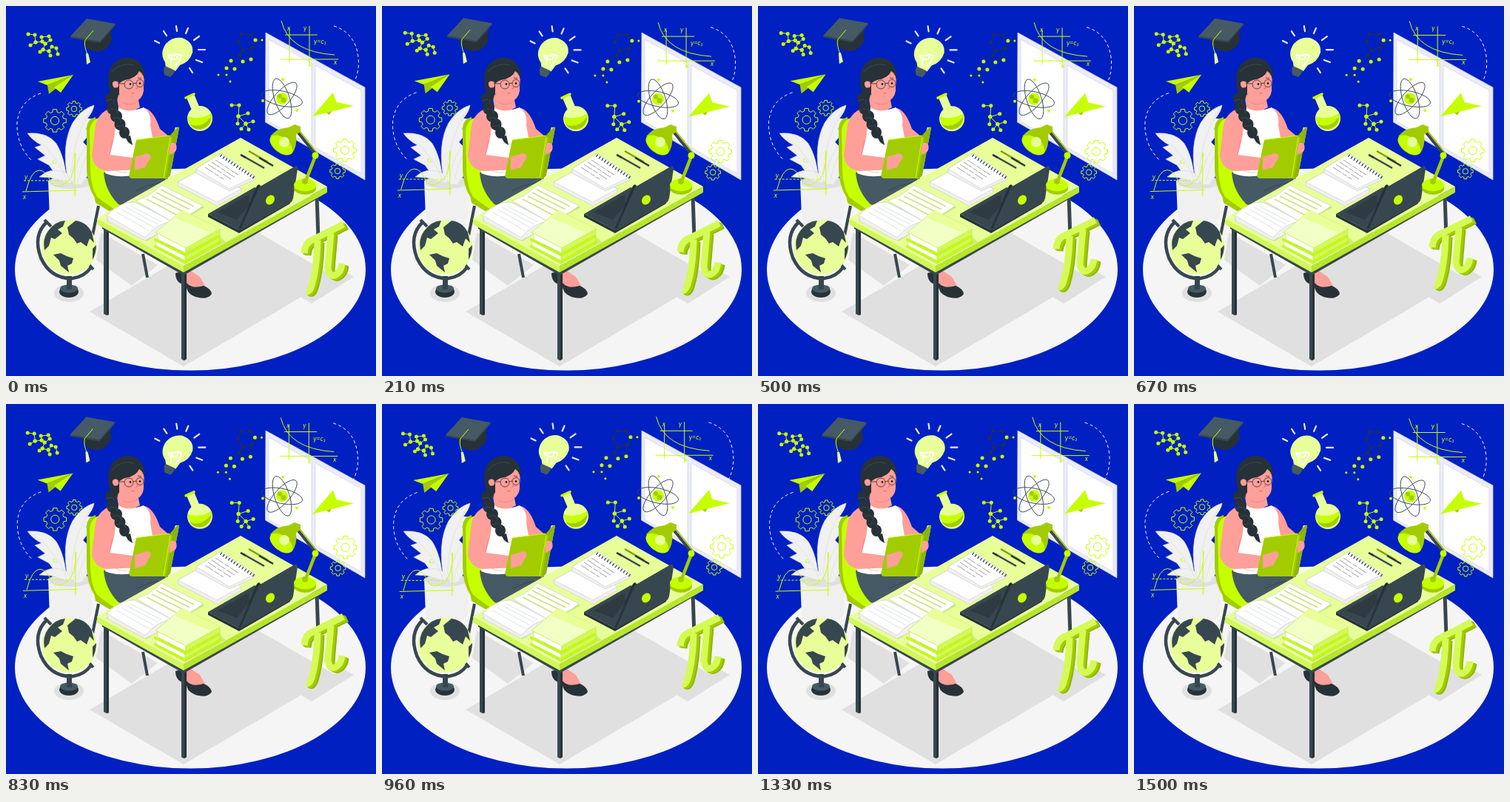
Recreate the animation shown at these times as an HTML page. Size 500x500 px, loop 1540 ms.

```html
<!DOCTYPE html>
<html lang="en">
<head>
<meta charset="utf-8">
<title>Study desk</title>
<style>
html, body { margin: 0; width: 100%; height: 100%; overflow: hidden; background: #0020c2 }
svg { display: block; width: 100vw; height: 100vh }
path { stroke-linejoin: round }
.line { fill: none; stroke: #c6ff00; stroke-width: 1 }
.nodes { marker-start: url(#node); marker-mid: url(#node); marker-end: url(#node) }
.lime { fill: #c6ff00 } .mid { fill: #a2cc00 } .pale { fill: #e8ff99 } .soft { fill: #f2ffc5 }
.ink { fill: #263238 } .slate { fill: #37474f } .steel { fill: #455a64 }
.skin { fill: #ff9f99 } .white { fill: #fff } .fog { fill: #f0f0f0 } .gray { fill: #e0e0e0 }
.dash { fill: none; stroke: #fff; stroke-width: 1; stroke-dasharray: 4 3.5 }
.thin { fill: none; stroke: #37474f; stroke-width: .9 }
text { font: italic 9px Lato, sans-serif; fill: #c6ff00 }
</style>
</head>
<body>
<svg viewBox="0 0 500 500">
<defs>
  <marker id="node" markerUnits="userSpaceOnUse" markerWidth="6" markerHeight="6" refX="3" refY="3"><circle cx="3" cy="3" r="2.500" class="lime"/></marker>
  <g id="piShape" fill="none" stroke-width="9">
    <path d="M404 335Q405 320 417 316L457 296"/>
    <path d="M422 318Q421 354 415 375Q412 388 407 386"/>
    <path d="M440 308Q437 342 436 355Q438 369 447 364Q454 360 455 349"/>
  </g>
</defs>

<ellipse cx="249" cy="356" rx="237" ry="136.500" fill="#f5f5f5"/>
<path class="gray" d="M113 413L240 487 445 366 318 293ZM398 393L413 402 470 366 456 358ZM128 306L205 350 170 378 122 343Z"/>
<ellipse class="gray" cx="85" cy="388" rx="20" ry="12"/>

<!-- window -->
<path fill="#ebecf7" stroke="#c9cce2" stroke-width=".8" d="M351 36L485 110 485 235 350.500 157Z"/>
<path class="white" stroke="#d3d6ea" stroke-width=".8" d="M355 45L413 77 413 189 355 156ZM418 80L480 114 480 227 418 191Z"/>

<!-- plant -->
<path class="fog" d="M57 236Q86 224 117 236L116 284Q103 302 86 303Q67 300 59 285Z"/>
<ellipse class="gray" cx="87" cy="238" rx="29" ry="9"/>
<g class="fog" stroke="#dcdcdc" stroke-width=".6">
  <path d="M84 237Q74 188 90 158Q102 139 119 134Q118 142 110 152L119 153 108 166 115 170 104 184 110 190 98 208Q94 222 92 238Z"/>
  <path d="M29 172Q56 170 68 186Q80 205 82 238Q66 228 58 215L43 207 53 202 39 191 48 188Q36 182 29 172Z"/>
  <path d="M91 241Q94 194 124 176Q128 207 102 241Z"/>
  <path d="M45 231Q61 216 82 226L88 240 61 232Z"/>
  <path fill="none" d="M89 238Q86 186 116 138M83 238Q70 200 32 173M97 238Q104 204 122 182"/>
</g>

<!-- chair -->
<path class="mid" d="M109 164Q110 153 121 150L137 275 121 260Q110 246 109 220Z"/>
<path class="lime" d="M113 167Q116 153 126 151L144 218 160 265 150 279 123 258Q115 245 114 222Z"/>
<path d="M125 270L117 310M185 335L191 367" stroke="#37474f" stroke-width="4"/>
<path class="mid" d="M119 256L151 278 151 284 121 266Z"/>

<!-- feet -->
<path class="ink" d="M229 361Q238 357 246 368L244 377Q229 376 229 361Z"/>
<path class="skin" d="M241 352L262 366 270 380 258 387 243 380Z"/>
<path class="ink" d="M244 374Q251 383 267 378Q277 382 278 389Q272 398 256 393Q242 388 244 374Z"/>

<!-- reader -->
<path class="steel" d="M132 225L177 220Q215 225 232 243L240 265 190 280 152 268Q134 250 132 225Z"/>
<path fill="none" stroke="#37474f" d="M176 250Q202 235 228 240"/>
<path class="skin" d="M188 138Q200 142 208 166L221 177 229 185Q233 193 227 199L214 205 194 184Z"/>
<path class="white" d="M142 139L153 135Q166 145 186 137Q197 145 195 161L198 178 193 220Q162 237 134 226Q139 194 136 174Z"/>
<path fill="none" stroke="#e0e0e0" stroke-width="1.500" d="M163 185Q179 190 191 180M141 210Q145 227 164 225"/>
<path class="skin" d="M149 120L152 137Q166 146 181 137L178 123Z"/>
<path class="skin" d="M142 138Q126 143 121 160L116 202Q118 220 136 223L181 221Q197 214 200 204L191 199 179 206 140 201Q151 168 147 147Z"/>
<path fill="none" stroke="#ef8580" stroke-width=".8" d="M140 201L144 181M178 207L190 212M157 130Q167 136 178 129"/>
<path class="skin" d="M151 88L184 83Q188 97 186 109Q187 121 179 127Q167 131 153 122Z"/>
<path class="ink" d="M139 106Q135 82 152 73Q169 65 181 77Q189 85 187 99Q185 91 180 88Q176 97 164 99Q156 101 153 105L153 118 146 121Q139 116 139 106Z"/>
<circle class="skin" cx="148" cy="106" r="4.500"/>
<g class="ink">
  <path d="M139 98Q136 116 150 128L153 115Q144 113 143 102ZM161 177L168 175 171 188 165 184Z"/>
  <ellipse cx="142" cy="125" rx="8" ry="8"/><ellipse cx="144" cy="138" rx="8" ry="9"/><ellipse cx="149" cy="149" rx="8" ry="8"/>
  <ellipse cx="154" cy="160" rx="7.500" ry="8"/><ellipse cx="160" cy="171" rx="7" ry="8"/>
</g>
<path fill="none" stroke="#455a64" stroke-width=".6" d="M136 128Q145 123 147 132M138 141Q149 136 151 145M144 152Q154 148 156 157M149 163Q160 158 162 168M143 89Q156 75 173 80"/>
<g fill="none" stroke="#263238" stroke-width=".8">
  <circle cx="166" cy="106" r="6"/><circle cx="181" cy="104.500" r="5"/>
  <path d="M172 105L176 104M151 105L160 105M162 99L168 98M178 97L183 98"/>
</g>
<path fill="none" stroke="#e06b68" d="M176 106L178 111 175 112M169 117Q172 119 174 117"/>
<circle cx="168" cy="105.500" r="1.300"/><circle cx="181" cy="104.500" r="1.300"/>

<!-- held book -->
<path class="white" d="M214 205L229 164 234 164 222 227Z"/>
<path fill="#8db600" d="M219 178L232 163 234 165 222 229 215 236Z"/>
<path class="mid" d="M176 181L221 175 225 178 216 233 170 233Q165 232 167 225Z"/>
<path fill="none" stroke="#c6ff00" d="M176 181L221 175M222 178L213 232"/>
<path class="skin" d="M174 204L191 199Q199 202 193 209L188 218 174 222ZM222 185Q231 183 230 192Q228 200 220 201Z"/>

<!-- desk -->
<path d="M420 255L422 315" stroke="#37474f" stroke-width="5"/>
<path class="slate" d="M132 300L139 304 139 417 136 418 132 416ZM237 355L244 355 244 477 240 479 237 477Z"/>
<path class="ink" d="M241 357L244 355 244 477 241 479ZM136 304L139 306 139 417 136 418Z"/>
<path class="slate" d="M130 296L240 357 427 253 427 257 240 364 130 301Z"/>
<path fill="#d2f75a" d="M123 287L240 351 240 360 123 295Z"/>
<path fill="#b8e62a" d="M240 351L434 244 434 252 240 360Z"/>
<path class="pale" d="M123 287L317 178 434 244 240 351Z"/>

<!-- desk papers -->
<path fill="#cbed72" d="M135 289L190 318 224 297 269 272 244 263ZM199 325L242 349 297 319 286 309Z"/>
<g stroke="#cfcfcf" stroke-width=".7">
  <path class="fog" d="M232 238L267 219 318 247 318 252 285 270 232 243Z"/>
  <path class="white" d="M232 238L267 219 318 247 285 265Z"/>
  <path class="fog" d="M257 220L291 199 336 230 335 235 302 250 257 226Z"/>
  <path class="white" d="M257 220L291 199 336 230 302 247Z"/>
  <path class="fog" d="M136 283L172 264 226 289 223 299 188 317 138 291Z"/>
  <path class="white" d="M136 283Q155 264 174 265L224 291Q203 294 188 313Z"/>
  <path class="white" d="M176 263Q194 258 210 242L266 270Q247 285 224 291Z"/>
</g>
<path stroke="#263238" stroke-width="4" stroke-dasharray="1.200 3.200" d="M290 202L335 232"/>
<path fill="none" stroke="#777" stroke-width=".7" stroke-dasharray="13 2 7 2" d="M283 208L315 229M278 211L310 232M273 214L304 234M269 218L294 234"/>
<path fill="none" stroke="#cfd4d6" stroke-width=".7" d="M168 270L211 292M162 272L205 295M156 275L200 299M150 279L194 304"/>
<path fill="none" stroke="#cfe07d" stroke-width="1.500" d="M209 248L254 271M203 252L248 275M197 257L242 279M190 261L234 284"/>
<path stroke="#37474f" stroke-width="2.500" d="M319 202L349 219"/>
<path stroke="#7fa000" stroke-width="2.500" d="M328 196L354 211"/>
<path stroke="#263238" stroke-width="2.500" d="M342 205L361 216M317 201L324 205"/>

<!-- closed books -->
<g stroke="#b9e632" stroke-width=".6">
  <path class="white" d="M203 317L242 337 242 345 203 325Z"/>
  <path fill="#d4f75a" d="M242 337L289 311 289 318 242 345Z"/>
  <path class="lime" d="M201 323L242 344 290 317 290 320 242 347 201 326Z"/>
  <path class="lime" d="M201 314L242 335 289 309 289 312 242 338 201 317Z"/>
  <path class="white" d="M205 307L243 326 243 334 205 315Z"/>
  <path fill="#d4f75a" d="M243 326L289 301 289 309 243 334Z"/>
  <path class="soft" d="M202 306L238 276 289 301 243 327Z"/>
  <path class="pale" stroke="none" d="M238 276L289 301 278 307 226 285Z"/>
</g>

<!-- laptop -->
<path class="slate" d="M273 281L336 245 383 266 315 303Z"/>
<path class="ink" d="M273 281L315 303 384 264 384 267 315 307 273 285Z"/>
<path fill="#2e3b42" d="M286 279L328 255 329 268 312 289Z"/>
<path class="ink" d="M314 303L338 245Q339 242 342 241L345 244 324 299Z"/>
<path class="slate" d="M316 304L341 247Q342 244 345 243L390 217Q394 215 394 220L388 260Q387 264 384 266Z"/>
<ellipse class="lime" cx="357" cy="262" rx="5.500" ry="7" transform="rotate(35 357 262)"/>

<!-- lamp -->
<ellipse class="mid" cx="404" cy="246" rx="15" ry="9"/><ellipse class="lime" cx="404" cy="242" rx="15" ry="8.500"/>
<path d="M404 239L418 203" stroke="#a2cc00" stroke-width="4.500"/>
<path d="M390 165L418 200" stroke="#37474f" stroke-width="4"/>
<path d="M394 165L421 199" stroke="#a2cc00" stroke-width="1.500"/>
<circle class="lime" cx="418" cy="202" r="4.500"/><circle class="mid" cx="404" cy="237" r="4"/>
<path class="mid" d="M357 176Q366 165 382 164L390 160 398 163 398 170 392 174Q394 190 386 200Z"/>
<ellipse class="lime" cx="372" cy="188" rx="10" ry="18" transform="rotate(-52 372 188)"/>
<circle class="pale" cx="376" cy="184" r="7"/>

<!-- globe -->
<path class="ink" d="M82 365L89 365 89 378Q98 380 98 386A13 8 0 0 1 72 386Q72 380 82 378Z"/>
<ellipse class="steel" cx="85" cy="382" rx="12" ry="5.500"/><path class="slate" d="M82 369H89V383H82Z"/>
<path fill="none" stroke="#37474f" stroke-width="4.500" d="M55 292Q36 310 47 340Q60 369 90 368Q106 366 115 353"/>
<path d="M52 289L61 298M109 346L118 356" stroke="#37474f" stroke-width="4"/>
<circle class="pale" cx="85.500" cy="326" r="37"/>
<g class="slate">
  <path d="M57 304Q66 291 80 290L77 298 70 302 76 307 66 315 61 313 58 324 52 330Q49 314 57 304Z"/>
  <path d="M83 299L94 290Q109 292 116 306L119 320 113 314 109 325 101 319 96 321 91 314 85 309Z"/>
  <path d="M64 336L74 334 82 338 91 341 89 348 83 351 85 360 74 351 72 344Z"/>
  <path d="M117 328L122 323Q122 334 117 343Z"/>
</g>

<!-- floating things -->
<g data-move="1.300 -1.200">
  <path class="ink" d="M103 39L141 28 143 46Q137 61 122 62Q107 59 104 48Z"/>
  <path class="steel" d="M87 41L109 17 148 24 127 48Z"/>
  <path class="slate" d="M87 41L127 48 148 24 148 26 127 50 87 43Z"/>
  <path class="line" d="M118 33L107 46Q105 54 110 65"/>
  <path class="pale" d="M108 64L111 64 114 76 109 79Z"/>
</g>
<path data-move="1.700 -2.300" class="line nodes" d="M30 38L39 39 40 49 33 53M40 49L49 48 48 42 58 41M49 48L53 51 60 46M53 51L50 59 46 62M50 59L58 61 62 55 68 57 70 65M58 61L60 67"/>
<g data-move=".9 -1.200">
  <path class="lime" d="M43 102L91 93 56 107Z"/><path class="mid" d="M56 107L91 93 58 119Z"/><path class="lime" d="M65 110L91 93 74 117Z"/>
</g>
<path data-move="-.7 -1.700" class="dash" d="M47 118Q18 128 15 158Q14 188 34 208"/>
<g data-move="-.6 -1.700" class="line" data-gears="66 155 15.500 92 139 10.500"></g>
<g data-move="-1.900 -2.700">
  <path class="line" d="M22 251L96 249M93 198V257M27 250Q34 222 45 222Q54 222 61 239Q69 249 82 238Q93 231 94 199"/>
  <path class="line" stroke-dasharray="3 2" d="M24 236H86"/>
  <text x="23" y="261">x</text><text x="25" y="234">y</text><text x="62" y="213">c₁</text>
</g>
<g data-move="-.6 .6">
  <path class="pale" d="M215 76Q207 64 216 51Q225 41 238 43Q254 49 252 63Q248 76 235 80L229 88 216 83Z"/>
  <path fill="none" stroke="#fff" stroke-width="1.800" d="M222 80L224 67 219 66 221 71 230 72 233 65 237 67 234 74 228 82M224 67L233 65"/>
  <path class="steel" d="M215 81L228 87 226 92 222 96 214 93 213 86Z"/>
  <path stroke="#e8ecff" stroke-width="2.200" stroke-linecap="round" d="M201 47L207 50M213 34L217 40M230 27L231 34M246 30L243 37M261 41L254 46M269 59L260 59M265 76L257 73M252 90L248 84"/>
</g>
<g data-move="0 .3">
  <circle class="pale" cx="262" cy="152" r="17"/><path class="pale" d="M244 124L254 119 262 138 252 143Z"/>
  <path class="lime" d="M246 149Q262 155 277 145A16 16 0 1 1 246 149Z"/>
  <path class="mid" d="M248 160Q265 166 277 150A16 16 0 0 1 248 160Z"/>
  <path d="M243 124L254 119" stroke="#c6ff00" stroke-width="3.500" stroke-linecap="round"/>
</g>
<g data-move="1.200 1.300">
  <path fill="none" stroke="#263238" d="M318 38H331L337 47 333 56 320 59 314 48ZM337 47H346M333 56L330 68 320 75M320 59L316 66 304 73 298 84 309 85 320 75 316 66M298 84V93H287M298 93L303 102"/>
  <path class="nodes" fill="none" d="M337 46L304 74 298 84 309 85 320 75 331 72"/>
  <g class="ink"><circle cx="318" cy="38" r="2"/><circle cx="331" cy="38" r="2"/><circle cx="314" cy="48" r="2"/><circle cx="333" cy="56" r="2"/><circle cx="320" cy="60" r="2"/><circle cx="316" cy="66" r="2"/></g>
  <g class="lime"><circle cx="346" cy="46" r="1.500"/><circle cx="287" cy="93" r="1.500"/><circle cx="298" cy="93" r="1.500"/><circle cx="303" cy="102" r="1.500"/></g>
</g>
<path data-move="-.3 1.100" class="line nodes" d="M305 134L315 134 314 149 327 145M314 149L313 159M314 149L324 159 334 156M324 159L328 167M324 159L318 166"/>
<g data-move="1.500 3">
  <path class="line" d="M372 20Q382 62 444 66M371 72H449M410 27V81M383 30V77M377 39H421"/>
  <text x="402" y="33">y</text><text x="380" y="33">x</text><text x="416" y="51">y=c₃</text><text x="443" y="79">x</text><text x="409" y="82">x</text>
</g>
<path data-move="1.700 2.400" class="dash" d="M443 27Q472 36 476 69Q478 88 470 104"/>
<g data-move="0 1.200">
  <g class="thin">
    <ellipse cx="373" cy="125" rx="28" ry="10" transform="rotate(12 373 125)"/>
    <ellipse cx="373" cy="125" rx="28" ry="10" transform="rotate(72 373 125)"/>
    <ellipse cx="373" cy="125" rx="28" ry="10" transform="rotate(132 373 125)"/>
  </g>
  <circle class="lime" cx="373" cy="125" r="8"/>
  <g class="mid"><circle cx="370" cy="122" r="3"/><circle cx="375" cy="127" r="3.500"/></g>
  <g class="lime"><circle cx="374" cy="99" r="2"/><circle cx="347" cy="128" r="2"/><circle cx="393" cy="141" r="2"/></g>
</g>
<g data-move="0 1">
  <path class="lime" d="M414 149L442 117 447 131Z"/><path class="mid" d="M414 149L447 131 437 147 431 143Z"/><path class="lime" d="M414 149L448 130 470 135Z"/>
</g>
<g data-move="-1.200 2.500" class="line" data-gears="458 195 15.500 448 223 10.500"></g>
<g id="pi">
  <use href="#piShape" stroke="#8fb800" x="4" y="2"/>
  <use href="#piShape" stroke="#a2cc00" x="2" y="1"/>
  <use href="#piShape" stroke="#d5fa55" x="-1" y="-1"/>
</g>
</svg>
<script>
const LOOP = 1540, PEAK = 355;
const wave = (t, peak) => Math.cos((t - peak) / LOOP * 2 * Math.PI);

function gear(cx, cy, r) {
  const teeth = 8, points = [];
  for (let i = 0; i < teeth; i++) {
    for (const [offset, k] of [[-.32, .78], [-.22, 1], [.22, 1], [.32, .78]]) {
      const a = (i + offset) / teeth * 2 * Math.PI;
      points.push(`${cx + r * k * Math.cos(a)},${cy + r * k * Math.sin(a)}`);
    }
  }
  return `<path d="M${points.join('L')}Z"/><circle cx="${cx}" cy="${cy}" r="${r * .36}"/>`;
}

for (const el of document.querySelectorAll('[data-gears]')) {
  const [x1, y1, r1, x2, y2, r2] = el.dataset.gears.split(' ').map(Number);
  el.innerHTML = gear(x1, y1, r1) + gear(x2, y2, r2);
}

const floaters = [...document.querySelectorAll('[data-move]')]
  .map(el => ({ el, move: el.dataset.move.split(' ').map(Number) }));
const pi = document.getElementById('pi');
const start = performance.now();

function draw(now) {
  const t = Math.max(0, now - start) % LOOP;
  const drift = wave(t, PEAK) - wave(0, PEAK);
  for (const { el, move: [dx, dy] } of floaters) {
    el.setAttribute('transform', `translate(${dx * drift} ${dy * drift})`);
  }
  pi.setAttribute('transform', `translate(0 ${4 * (wave(t, 0) - 1)})`);
  requestAnimationFrame(draw);
}
draw(start);
</script>
</body>
</html>
```
